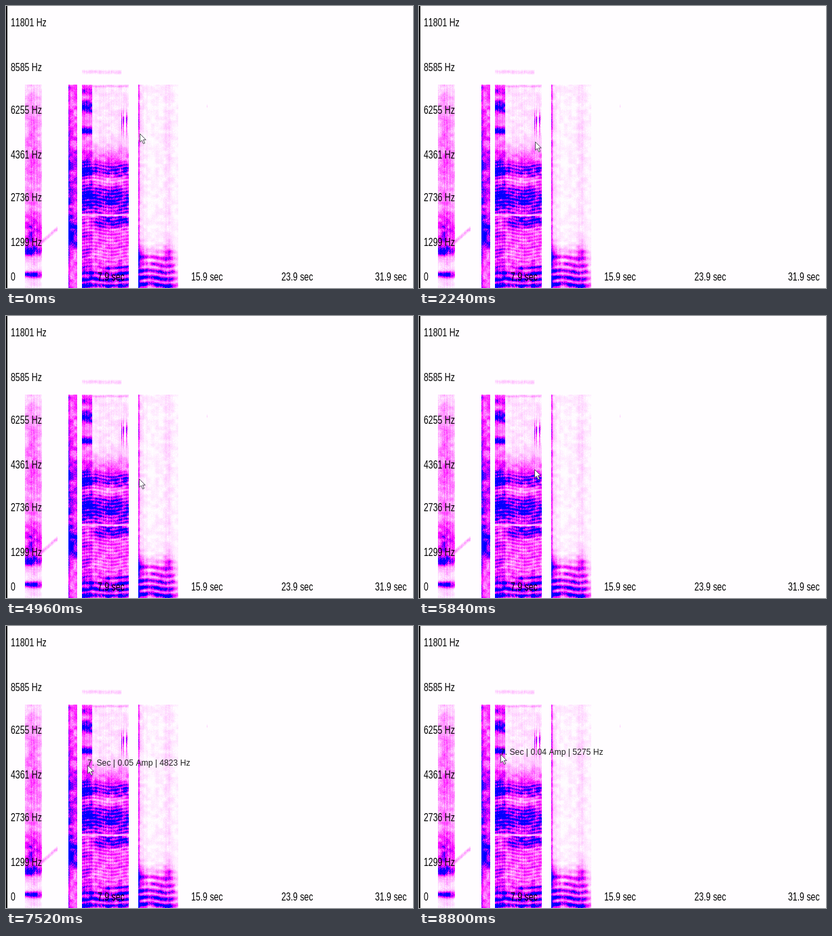
An HTML page with a canvas that plays this animation: 600x416 px, repeating every 8.84 s.

```html
<!DOCTYPE html>
<html lang="en">
<head>
<meta charset="utf-8">
<title>Spectrogram</title>
<style>
  html, body { margin: 0; width: 100%; height: 100%; overflow: hidden; background: #fffdff; }
  canvas, svg { position: absolute; left: 0; top: 0; width: 600px; height: 416px; }
  text { font-family: "Liberation Sans", Arial, sans-serif; font-kerning: none; white-space: pre; }
  #axes text { font-size: 16px; }
  #tip { font-size: 12.16px; fill: #222; }
</style>
</head>
<body>
<canvas id="plot" width="600" height="416"></canvas>
<svg viewBox="0 0 600 416">
  <g id="axes"></g>
  <text id="tip"></text>
  <path id="arrow" d="M.5 .5V12.8L3.3 10.2L5.5 15.2L7.6 14.3L5.4 9.4H9.2Z" fill="#fff" stroke="#45404c" stroke-width=".9"/>
</svg>
<script>
const W = 600, H = 416, LOOP = 8840, STEP = 40, TAU = 2 * Math.PI;
const $ = id => document.getElementById(id);
const clamp = v => Math.max(0, Math.min(1, v));
const smooth = k => k * k * (3 - 2 * k);
const mix = (a, b, k) => a + (b - a) * k;
const bell = (v, center, width) => Math.exp(-(((v - center) / width) ** 2));
const ridge = (y, gap) => .5 + .5 * Math.cos(TAU * y / gap);

// Repeatable noise: single grains and soft patches
function grain(x, y) {
  const n = Math.sin(x * 12.9898 + y * 78.233) * 43758.5453;
  return n - Math.floor(n);
}
function patch(x, y) {
  const ix = Math.floor(x), iy = Math.floor(y);
  const kx = smooth(x - ix), ky = smooth(y - iy);
  return mix(mix(grain(ix, iy), grain(ix + 1, iy), kx),
             mix(grain(ix, iy + 1), grain(ix + 1, iy + 1), kx), ky);
}

// Each sound: its span in x and its energy at a point
const sounds = [
  { left: 28, right: 52, energy: (x, y) =>
      (.1 * bell(y, 150, 40) + .2 * bell(y, 240, 60) + .45 * bell(y, 335, 30) +
       .7 * bell(y, 361, 6) + .95 * bell(y, 396, 4) + .12) * (.5 + .6 * bell(x, 38, 11)) },
  { left: 53, right: 75, energy: (x, y) => .2 * bell(y, 347 - (x - 53) * .85, 4) },
  { left: 92, right: 104, energy: (x, y) =>
      .34 + .25 * bell(y, 250, 60) + .6 * bell(y, 333, 24) + .2 * bell(x, 92, 2) },
  { left: 112, right: 180, energy: vowel },
  { left: 195, right: 253, energy: murmur },
  { left: 296, right: 296, energy: (x, y) => .15 * bell(y, 147, 3) }
];

function vowel(x, y) {
  if (y < 116) return x < 170 ? .12 * bell(y, 97, 4) : 0;
  const wave = 2 * Math.sin((x - 112) / 9);
  const onset = x < 127 ? 1 : 0;
  let e = .1 + .12 * bell(y, 118, 1.5) + .2 * bell(y, 225, 18);
  e += onset * (.45 * bell(y, 125, 5) + .7 * bell(y, 148, 9) + .6 * bell(y, 184, 6) + .15);
  e += (.6 + .3 * onset) * bell(y, 242, 11) + .85 * bell(y + wave, 284, 22);
  e += .6 * bell(y, 317, 9) * clamp((x - 125) / 10) + .3 * bell(y, 350, 40);
  if (x > 168) e += .5 * bell(y, 172, 14) * Math.round(grain(x, 5));
  e *= (1 - .75 * bell(y, 308, 2)) * (1 - .35 * bell(y, 256, 3));
  if (y > 230) e *= .7 + .5 * ridge(y + wave, 5);
  return e + clamp((y - 372) / 25) * (.2 + .7 * ridge(y + wave / 2 - 412, 9));
}

function murmur(x, y) {
  const wave = 1.8 * Math.sin((x - 195) / 9);
  const tail = clamp((256 - x) / 14);
  const burst = bell(x, 195, 9) + .7 * bell(x, 238, 6);
  let e = .07 + .35 * bell(x, 195, 1.5) + .05 * burst;
  e += .3 * burst * bell(y, 368, 16);
  e += clamp((y - 350) / 60) * tail * (.25 + .8 * ridge(y + wave - 411, 10));
  return e;
}

function drawPlot() {
  const ctx = $("plot").getContext("2d");
  ctx.fillStyle = "#fffdff";
  ctx.fillRect(0, 0, W, H);
  const img = ctx.getImageData(0, 0, W, H);
  for (const { left, right, energy } of sounds) {
    for (let x = left; x <= right; x++) {
      for (let y = 90; y < H; y++) {
        const top = y < 116 && left !== 112 ? 0 : 1;
        const rough = .2 + .8 * patch(x / 6, y / 5) + .45 * grain(x, y) + .35 * grain(x, 1);
        const v = clamp(energy(x, y) * top * rough * 1.08 - .055);
        const i = (y * W + x) * 4;
        img.data[i] = 255 * clamp(2 - 2 * v);
        img.data[i + 1] = 253 * clamp(1 - 2 * v);
      }
    }
  }
  ctx.putImageData(img, 0, 0);
  ctx.fillStyle = "#000";
  ctx.fillRect(0, 0, 2, H);
}

function addAxisText(text, x, y) {
  const el = document.createElementNS("http://www.w3.org/2000/svg", "text");
  el.textContent = text;
  el.setAttribute("transform", `translate(${x} ${y}) scale(.77 1)`);
  $("axes").append(el);
}

// Pointer moves; between them it rests. A bow bends the way out and back.
const moves = [
  { start: 0, end: 1400, x: 155, y: 215, bowX: 220, bowY: 20 },
  { start: 2040, end: 2240, x: 171, y: 200 },
  { start: 2240, end: 3480, x: 197, y: 240, bowX: 330, bowY: 40 },
  { start: 3640, end: 3720, x: 196, y: 251 },
  { start: 4640, end: 4960, x: 196, y: 240 },
  { start: 5440, end: 6440, x: 121, y: 201.1 },
  { start: 6440, end: 6600, x: 120.14, y: 204 },
  { start: 6840, end: 7520, x: 120.14, y: 205, bowY: 65 },
  { start: 8320, end: 8800, x: 120.14, y: 189 }
];

function pointerAt(t) {
  let from = { x: 197, y: 188 }, pose = { ...from, time: 0 };
  for (const m of moves) {
    if (t < m.start) break;
    const k = clamp((t - m.start) / (m.end - m.start));
    const bow = Math.sin(Math.PI * k) ** 2;
    pose = {
      x: mix(from.x, m.x, smooth(k)) + bow * (m.bowX || 0),
      y: mix(from.y, m.y, smooth(k)) + bow * (m.bowY || 0),
      time: Math.min(t, m.end)
    };
    from = m;
  }
  return pose;
}

const isPressed = t => (t >= 3400 && t < 4680) || t >= 6240;

function readout({ x, y, time }) {
  const sec = (7.05 + (x - 121) * 4.41 / 76).toFixed(2).replace(/0+$/, "");
  const amp = time < 5000 ? .02 : .08 - .04 * Math.sqrt(clamp((time - 6440) / 2360));
  const hz = Math.floor(4823.01 - 26.45714 * (y - 205) + .035154 * (y - 205) * (y - 240));
  return `${sec} Sec | ${amp.toFixed(2)} Amp | ${hz} Hz`;
}

function render() {
  const t = Math.floor(performance.now() % LOOP / STEP) * STEP;
  const p = pointerAt(t);
  const x = Math.round(p.x), y = Math.round(p.y);
  $("arrow").setAttribute("transform", `translate(${x} ${y})`);
  const tip = $("tip");
  tip.setAttribute("x", x);
  tip.setAttribute("y", y + 1);
  tip.textContent = isPressed(t) ? readout(p) : "";
  requestAnimationFrame(render);
}

drawPlot();
["11801 Hz", "8585 Hz", "6255 Hz", "4361 Hz", "2736 Hz", "1299 Hz", "0"]
  .forEach((s, i) => addAxisText(s, 7, Math.min(405, 30 + 64.5 * i + i % 2 * 1.5)));
for (let i = 0; i < 4; i++) {
  addAxisText(`${(7.9 + 8 * i).toFixed(1)} sec`, 135 + 135.5 * i + i % 2 * 2.5, 405);
}
render();
</script>
</body>
</html>
```
